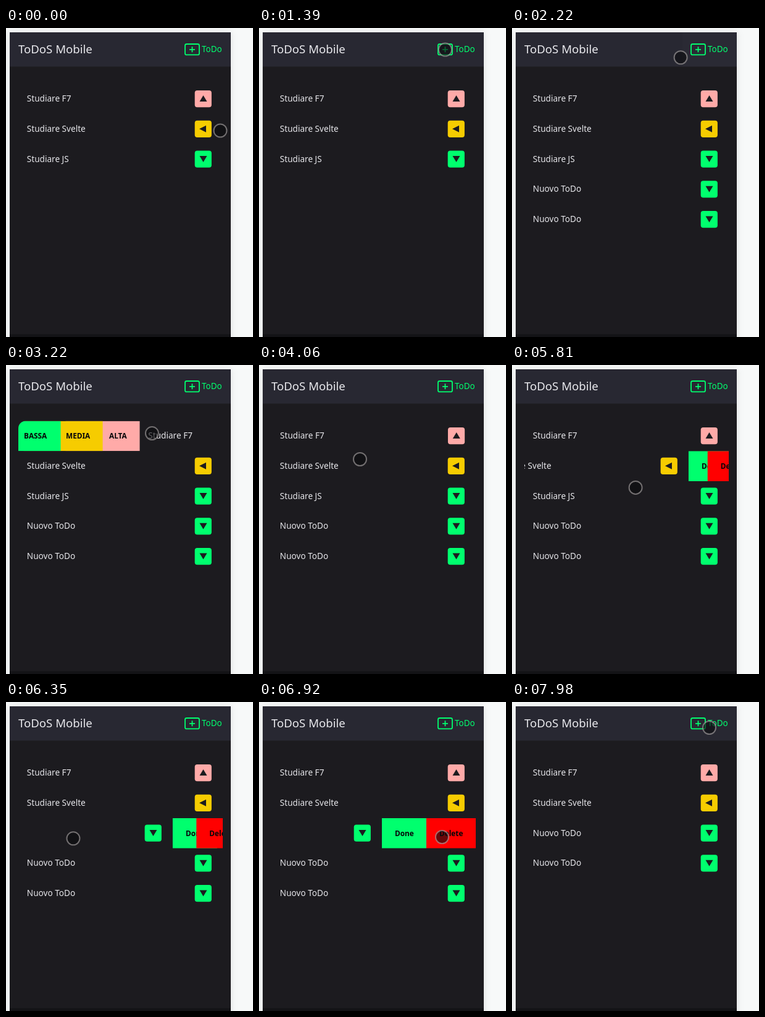
An HTML page that plays this animation: 400 by 500 pixels, repeating every 8000 ms.

```html
<!DOCTYPE html>
<html lang="it">
<head>
<meta charset="utf-8">
<title>ToDoS Mobile</title>
<style>
  html, body { margin: 0; width: 100%; height: 100%; overflow: hidden; background: #f7f9f9; }
  svg { display: block; }
  text { font-family: "Noto Sans", "Open Sans", sans-serif; white-space: pre; }
  .label { font-size: 13.6px; fill: #e6e6ea; }
  .action { font-size: 11.8px; font-weight: 600; fill: #060608; }
  .phone { filter: drop-shadow(0 0 6px rgba(0, 0, 0, .1)); }
</style>
</head>
<body>
<svg id="stage" width="400" height="500" viewBox="0 0 400 500">
  <defs>
    <clipPath id="listClip"><rect x="20" y="90.5" width="331" height="330" rx="12"/></clipPath>
    <clipPath id="linkClip"><rect x="276" y="7" width="88" height="56"/></clipPath>
  </defs>
  <rect width="400" height="500" fill="#f7f9f9"/>
  <rect class="phone" x="6" y="7" width="358" height="510" fill="#1c1b1f"/>
  <rect x="6" y="7" width="358" height="55.5" fill="#282832"/>
  <rect x="6" y="495.5" width="358" height="5" fill="#131316"/>
  <text x="20" y="41" font-size="18.6" fill="#e8e8ec">ToDoS Mobile</text>
  <g fill="none" stroke="#00ff6e" stroke-width="1.8">
    <rect x="290" y="26" width="23" height="17.4" rx="2.5"/>
    <path d="M297 34.8h9M301.5 30.3v9"/>
  </g>
  <text x="317" y="39" font-size="13.5" fill="#00ff6e">ToDo</text>
  <g id="ripples" clip-path="url(#linkClip)"></g>
  <g id="list" clip-path="url(#listClip)"></g>
  <circle id="cursor" r="10.5" fill="rgba(12,12,14,.62)" stroke="rgba(165,160,160,.65)" stroke-width="2"/>
</svg>
<script>
const LOOP = 8000, ROW = 48.75, TOP = 90.5, WIDTH = 331;
const GREEN = '#00ff6e', YELLOW = '#f6cc00', PINK = '#ffaaa8', RED = '#ff0000';
const $ = id => document.getElementById(id);

function set(el, attrs) {
  for (const key in attrs) el.setAttribute(key, attrs[key]);
}
function add(parent, tag, attrs, text) {
  const el = document.createElementNS('http://www.w3.org/2000/svg', tag);
  set(el, attrs);
  if (text) el.textContent = text;
  return parent.appendChild(el);
}

const clamp = x => Math.min(1, Math.max(0, x));
const smooth = x => x * x * (3 - 2 * x);
const easeOut = x => 1 - (1 - clamp(x)) ** 2.2;

// The pointer rests between eased strokes
const stroke = (start, end, x, y) => ({ start, end, x, y });
const home = { x: 347, y: 166 };
const addTap = { x: 301.5, y: 35 };
const swipeHigh = stroke(2690, 3520, 319, 110);
const swipeMiddle = stroke(4690, 5060, 43, 160);
const swipeLow = stroke(6210, 6480, 38, 225);
const strokes = [
  stroke(30, 500, 157, 190),
  stroke(500, 810, 222, 87),
  stroke(850, 1230, addTap.x, addTap.y),
  stroke(2190, 2350, 12, 165),
  stroke(2490, 2690, 40, 112),
  swipeHigh,
  stroke(3780, 4060, 163.5, 152.5),
  stroke(4060, 4540, 195, 168),
  swipeMiddle,
  stroke(5060, 5510, 217, 169),
  stroke(5700, 5890, 190, 216),
  swipeLow,
  stroke(6480, 6920, 296.5, 218.5),
  stroke(7130, 7980, 319.5, 41.5)
];

function pointer(t) {
  let { x, y } = home;
  for (const s of strokes) {
    const k = smooth(clamp((t - s.start) / (s.end - s.start)));
    x += (s.x - x) * k;
    y += (s.y - y) * k;
  }
  return { x, y };
}

const action = (text, color, width, pad) => ({ text, color, width, pad });
const rightActions = [action('Done', GREEN, 72, 21), action('Delete', RED, 80, 21)];
const leftActions = [
  action('BASSA', GREEN, 68, 8.5), action('MEDIA', YELLOW, 68, 8.5), action('ALTA', PINK, 60, 10.5)
];
const UP = 'M299.5 18.5l6 10h-12z', LEFT = 'M293 24l11-5.5v11z', DOWN = 'M293.5 19h12l-6 10z';

const rows = [
  { text: 'Studiare F7', color: PINK, mark: UP,
    actions: leftActions, dir: 1, drag: swipeHigh, close: 3775 },
  { text: 'Studiare Svelte', color: YELLOW, mark: LEFT,
    actions: rightActions, dir: -1, drag: swipeMiddle, close: 5715 },
  { text: 'Studiare JS', color: GREEN, mark: DOWN,
    actions: rightActions, dir: -1, drag: swipeLow, removed: 7110 },
  { text: 'Nuovo ToDo', color: GREEN, mark: DOWN, added: 1530 },
  { text: 'Nuovo ToDo', color: GREEN, mark: DOWN, added: 1910 }
];

for (const row of rows) {
  row.el = add($('list'), 'svg', { x: 20, width: WIDTH, overflow: 'hidden' });
  row.content = add(row.el, 'g', {});
  add(row.content, 'text', { x: 13.8, y: 28.5, class: 'label' }, row.text);
  add(row.content, 'rect', { x: 285.7, y: 10.5, width: 27.2, height: 27.2, rx: 4, fill: row.color });
  add(row.content, 'path', { d: row.mark, fill: '#1c1b1f' });
  if (row.actions) addButtons(row);
}

function addButtons(row) {
  row.span = 0;
  row.buttons = row.actions.map(({ text, color, width, pad }) => {
    const el = add(row.el, 'g', {});
    // Left buttons extend outwards so an overswipe leaves no gap
    const extra = row.dir > 0 ? 60 : 0;
    add(el, 'rect', { x: -extra, width: width + extra, height: ROW, fill: color });
    add(el, 'text', { x: pad, y: 28.5, class: 'action' }, text);
    const button = { el, width, offset: row.span };
    row.span += width;
    return button;
  });
  if (row.dir > 0) [...row.buttons].reverse().forEach(b => row.el.append(b.el));
}

function swipeShift({ dir, span, drag, close }, t) {
  const held = pointer(Math.min(t, drag.end)).x - pointer(drag.start).x;
  const pulled = t < drag.start ? 0 : Math.max(0, dir * held);
  const shift = pulled > span ? span + (pulled - span) ** .8 : pulled;
  return dir * shift * (close ? 1 - easeOut((t - close) / 300) : 1);
}

function drawSwipe(row, t, gone) {
  const { dir, span } = row, shift = swipeShift(row, t);
  const folded = 1 - Math.min(1, Math.abs(shift) / span);
  set(row.content, { transform: `translate(${shift - gone * (WIDTH + shift)} 0)` });
  for (const { el, offset, width } of row.buttons) {
    const x = dir > 0
      ? shift - span + offset + (span - offset - width) * folded
      : WIDTH + shift + offset * (1 - folded);
    set(el, { transform: `translate(${x} 0)` });
    el.style.display = Math.abs(shift) < 1 ? 'none' : '';
  }
}

const ripples = [1440, 1820].map(start => ({
  start, el: add($('ripples'), 'circle', { cx: addTap.x, cy: addTap.y, fill: '#fff' })
}));

function draw(t) {
  let y = TOP;
  for (const row of rows) {
    const gone = row.removed ? easeOut((t - row.removed) / 300) : 0;
    const height = t < (row.added || 0) ? 0 : ROW * (1 - gone);
    set(row.el, { y, height });
    row.el.style.display = height < .01 ? 'none' : '';
    if (row.actions) drawSwipe(row, t, gone);
    y += height;
  }
  for (const { start, el } of ripples) {
    const age = t - start;
    set(el, {
      r: 70 * easeOut(age / 300),
      opacity: age < 0 ? 0 : .1 * (1 - clamp((age - 180) / 240))
    });
  }
  const { x, y: cy } = pointer(t);
  set($('cursor'), { cx: x, cy });
}

const begin = performance.now();
function frame() {
  draw((performance.now() - begin) % LOOP);
  requestAnimationFrame(frame);
}
frame();
</script>
</body>
</html>
```
